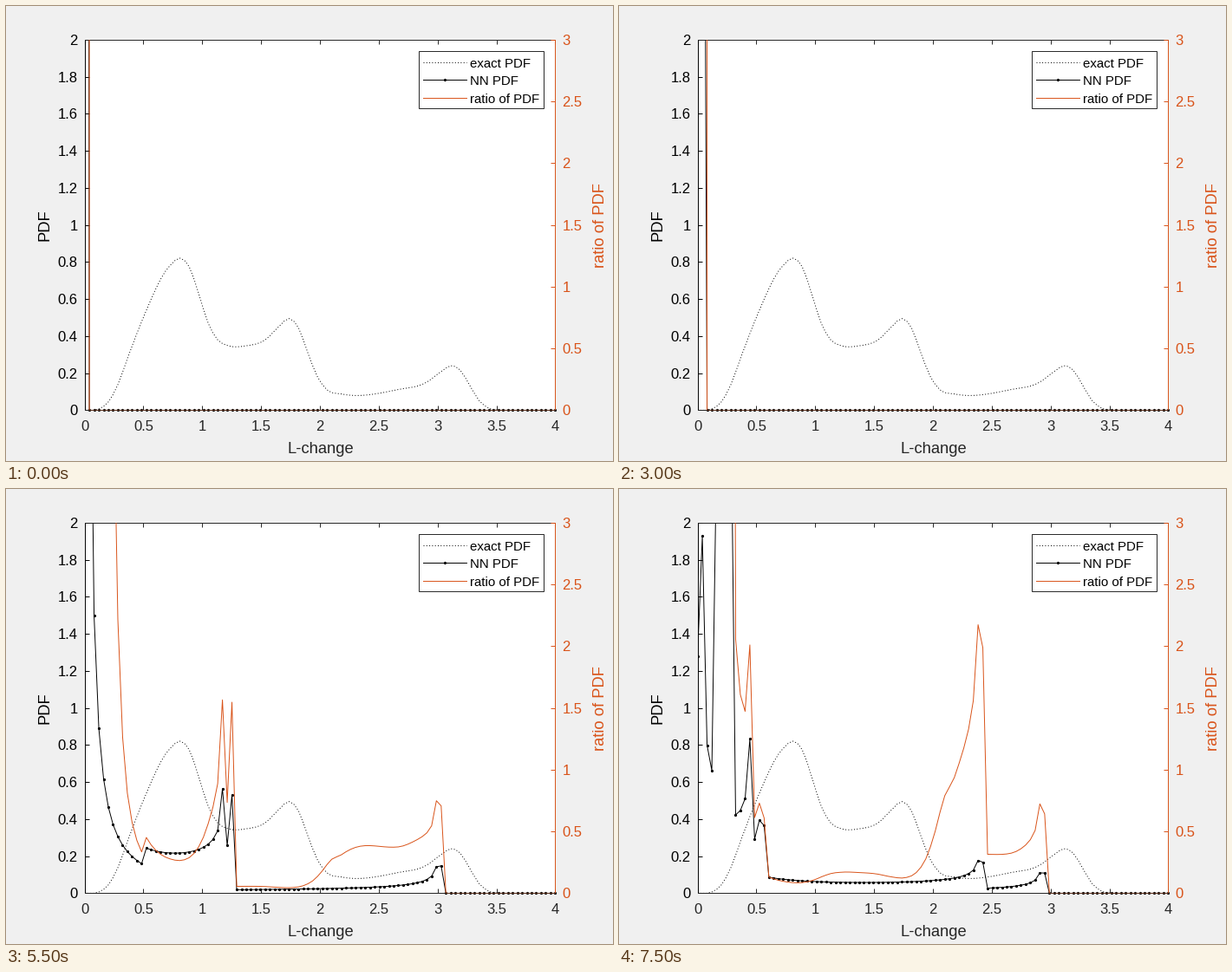
A matplotlib script for the animation above (8 s loop, 700 by 525 pixels).

```python
import numpy as np
import matplotlib.pyplot as plt
from matplotlib.animation import FuncAnimation
from matplotlib.patches import Rectangle
from matplotlib.transforms import Bbox

W, H, DPI = 700, 525, 100
N = 100
ORANGE, INK, BLACK = "#D95319", "#262626", "#000000"
LW = 0.7
plt.rcParams["font.family"] = "Liberation Sans"
plt.rcParams["lines.scale_dashes"] = False

bins = np.arange(N)
x = np.linspace(0, 4, N)


def pt(px):
    return px * 72 / DPI


def smooth(knots):
    """Cubic Hermite curve through (bin, value) points."""
    k, v = np.array(knots).T
    m = np.gradient(v, k)
    j = np.clip(np.searchsorted(k, bins, side="right") - 1, 0, len(k) - 2)
    h = k[j + 1] - k[j]
    t = (bins - k[j]) / h
    return ((1 + 2 * t) * (1 - t) ** 2 * v[j] + t * (1 - t) ** 2 * h * m[j]
            + t * t * (3 - 2 * t) * v[j + 1] + t * t * (t - 1) * h * m[j + 1])


def fold(start, edge, strength):
    """Inverse square root singularity at `edge`, averaged over each bin."""
    root = np.sqrt(np.maximum(edge - np.arange(N + 1), 0))
    return np.where(bins >= start, strength * (root[:-1] - root[1:]), 0)


def density(spike, decay=0, cut=0, *folds):
    """Spike in bin 0, a power-law decay up to `cut`, and folded edges."""
    p = np.where(bins < cut, decay * np.maximum(bins, 1) ** -1.3, 0)
    p = p + sum(fold(*f) for f in folds)
    p[0] = spike
    return p


exact = np.maximum(smooth([
    (0, 0), (3, .007), (5, .045), (7, .138), (9, .278), (12, .478),
    (18, .782), (20.3, .82), (22, .775), (24, .63), (26, .47), (28, .38),
    (30, .35), (34, .348), (38, .38), (41, .455), (43, .495), (45, .445),
    (47, .307), (49, .18), (51, .11), (54, .088), (66, .112), (72, .152),
    (75, .209), (77.3, .241), (79, .217), (81, .135), (83, .052),
    (85, .011), (88, 0), (99, 0)]), 0)

# All mass sits at zero first, then the support grows to the right.
steps = [
    *map(density, (24.7, 3.4, 1.7, .9, 3.45, 24)),
    density(20, 6, 2),
    density(20, 4.2, 7, (6, 7, 1.5)),
    density(20, 1.22, 13, (0, 13, .6), (12, 13, 1.25)),
    density(15, 4.5, 31, (0, 31, .55)),
    density(15, 4.75, 28, (0, 77.02, .15), (0, 35.35, .3), (18, 27.28, .72)),
    density(15, 3.65, 32, (0, 75.35, .25), (13, 32, .47), (13, 30, .35)),
    density(15, 4, 25, (0, 74.8, .28), (0, 40.9, .3), (9, 24.7, .4)),
    density(15, 3.75, 21, (0, 73.53, .295), (0, 48.8, .27), (0, 20.6, .54)),
    density(15, 3.8, 18, (0, 73.8, .26), (0, 54.8, .24), (0, 17.6, .45)),
    density(1.28, 1.9, 61, (0, 73.33, .19), (0, 60.3, .24),
            (4, 7.15, 6), (3, 11.9, .6), (3, 14.3, .5)),
]


def ratio(nn):
    return np.minimum(nn / np.maximum(exact, 1e-5), 1000)


fig = plt.figure(figsize=(W / DPI, H / DPI), dpi=DPI, facecolor="#F0F0F0")
ax = fig.add_axes([90.6 / W, 58.55 / H, 542.8 / W, 427.6 / H])
ax2 = ax.twinx()
ax.set(xlim=(0, 4), ylim=(0, 2))
ax2.set_ylim(0, 3)


def marks(stop, step):
    ticks = np.arange(0, stop + step / 2, step)
    return ticks, [f"{v:g}" for v in ticks.round(1)]


ax.set_xticks(*marks(4, .5))
ax.set_yticks(*marks(2, .2))
ax2.set_yticks(*marks(3, .5))

tick = dict(direction="in", length=pt(5.4), width=LW, labelsize=pt(16.67))
ax.tick_params(axis="x", top=True, pad=pt(12), color=INK, labelcolor=INK, **tick)
ax.tick_params(axis="y", pad=pt(8), color=BLACK, labelcolor=BLACK, **tick)
ax2.tick_params(axis="y", pad=pt(8), color=ORANGE, labelcolor=ORANGE, **tick)
for side in ("left", "top", "bottom"):
    ax2.spines[side].set_visible(side == "bottom")
    ax.spines[side].set(color=BLACK if side == "left" else INK, linewidth=LW)
ax.spines["right"].set_visible(False)
ax2.spines["right"].set(color=ORANGE, linewidth=LW)
ax2.spines["bottom"].set(color=INK, linewidth=LW, alpha=.7)

dotted = dict(color=BLACK, lw=LW, ls=(0, (pt(1), pt(2.3))), dash_capstyle="butt")
marked = dict(color=BLACK, lw=LW, marker="o", ms=pt(3.2), mew=0)
plain = dict(color=ORANGE, lw=LW)

exact_line, = ax.plot(x, exact, **dotted)
nn_line, = ax.plot(x, steps[0], **marked)
ratio_line, = ax2.plot(x, ratio(steps[0]), **plain)
for line in (exact_line, nn_line, ratio_line):
    line.set_clip_box(Bbox([[91, 58], [634, 486]]))

# Overlay in pixel units for the axis titles and the legend.
top = fig.add_axes([0, 0, 1, 1], zorder=5)
top.set(xlim=(0, W), ylim=(H, 0))
top.axis("off")


def label(px, py, text, size, color, ha="center", rot=0):
    top.text(px, py, text, fontsize=pt(size), color=color, ha=ha,
             va="baseline", rotation=rot, rotation_mode="anchor")


label(362.5, 516, "L-change", 18.33, INK)
label(49.5, 253, "PDF", 18.33, BLACK, rot=90)
label(690, 253, "ratio of PDF", 18.33, ORANGE, rot=90)

top.add_patch(Rectangle((476.4, 52.4), 144, 66, fc="white", ec=INK, lw=LW))
rows = [("exact PDF", dotted), ("NN PDF", marked), ("ratio of PDF", plain)]
for (name, style), y in zip(rows, (65.3, 85.3, 106.3)):
    top.plot([481, 531], [y, y], **{**style, "marker": None})
    label(535, y + 5.7, name, 15, BLACK, ha="left")
top.plot([506], [85.3], **marked)


def update(i):
    nn_line.set_ydata(steps[i])
    ratio_line.set_ydata(ratio(steps[i]))
    return nn_line, ratio_line


anim = FuncAnimation(fig, update, frames=len(steps), interval=500, repeat=True)
plt.show()
```
